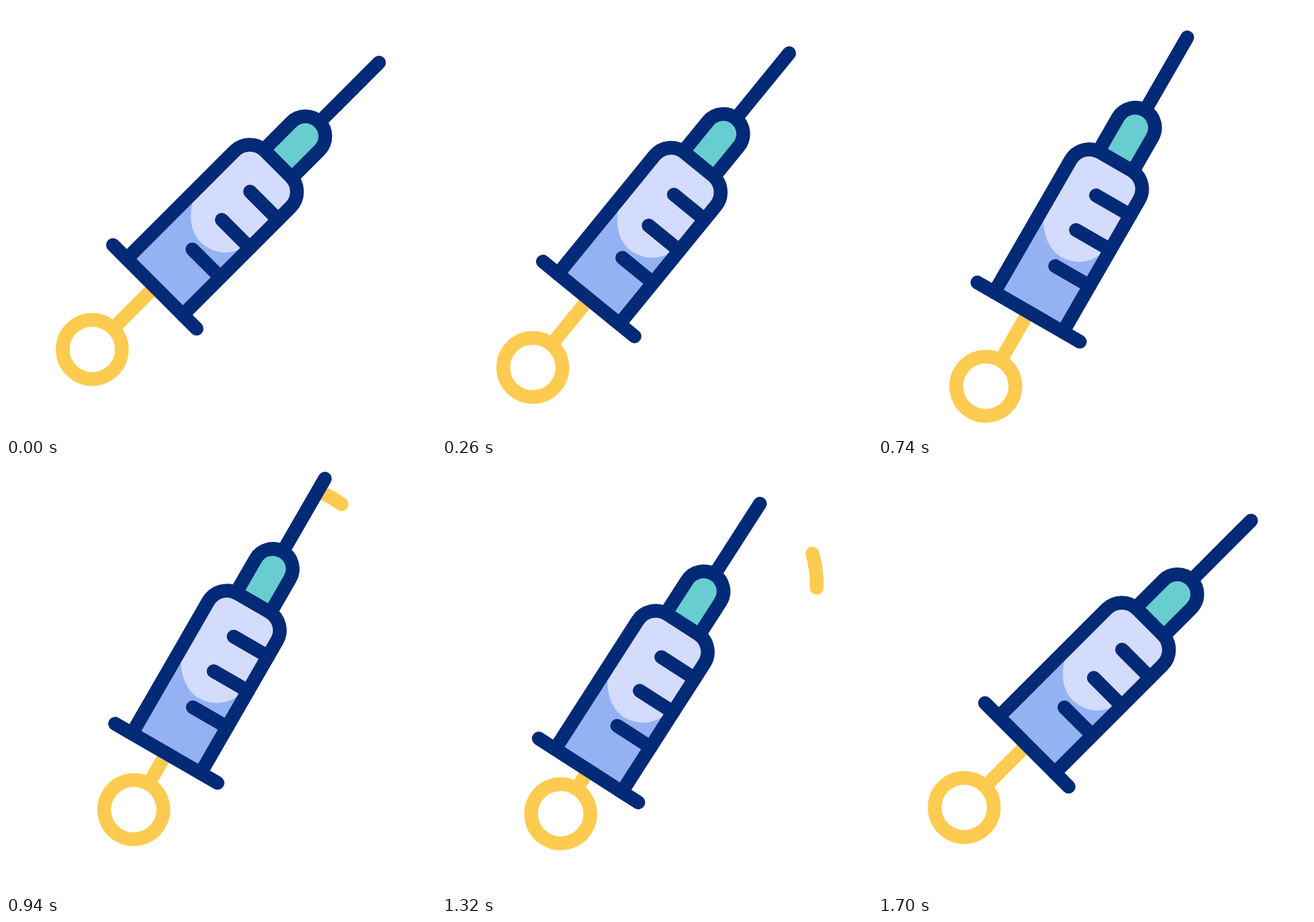
An HTML page that plays this animation: 640 px wide and 640 px high, repeating every 2.4 s.

```html
<!DOCTYPE html>
<html lang="en">
<head>
<meta charset="utf-8">
<title>Syringe</title>
<style>
  html, body { margin: 0; width: 100%; height: 100%; overflow: hidden; background: #fff; }
  svg { display: block; width: 100%; height: 100%; }
  .navy, .gold { fill: none; stroke-width: 20.5; stroke-linecap: round; }
  .navy { stroke: #032a76; }
  .gold { stroke: #fecb51; }
</style>
</head>
<body>
<svg viewBox="0 0 640 640">
  <defs>
    <path id="barrel" d="M-59 0V-227a32 32 0 0 1 32-32h54a32 32 0 0 1 32 32V0"/>
    <clipPath id="inside"><use href="#barrel"/></clipPath>
  </defs>
  <path id="drop" class="gold"/>
  <!-- Needle points up; the origin is the middle of the flange -->
  <g id="syringe">
    <g id="plunger" class="gold">
      <path d="M0-44V-131"/>
      <circle r="44"/>
    </g>
    <path class="navy" d="M0-347V-472"/>
    <path class="navy" style="fill:#68cdd1" d="M-29.6-259V-317a29.6 29.6 0 0 1 59.2 0V-259"/>
    <g clip-path="url(#inside)">
      <path fill="#94b2f3" d="M-59 0V-259H59V0z"/>
      <path fill="#d3dcfd" d="M-59-259H59V-128H50Q36-97 1-95Q-28-96-49-128H-59z"/>
    </g>
    <path class="navy" d="M0-200.5H59M0-141H59M0-79H59"/>
    <use href="#barrel" class="navy"/>
    <path class="navy" d="M-88 0H88"/>
  </g>
</svg>
<script>
const LOOP = 2400;
const [drop, syringe, plunger] = ['drop', 'syringe', 'plunger'].map(id => document.getElementById(id));

// Cubic ease from 0 to 1 with a chosen slope at each end
function ease(t, from, to, m0 = 0, m1 = 0) {
  const u = Math.min(1, Math.max(0, (t - from) / (to - from)));
  return u * u * (3 - 2 * u) + m0 * u * (1 - u) ** 2 + m1 * u * u * (u - 1);
}

// Linear interpolation through [time, value] pairs
function along(keys, t) {
  let i = 1;
  while (i < keys.length - 1 && t > keys[i][0]) i++;
  const [t0, a] = keys[i - 1], [t1, b] = keys[i];
  return a + (b - a) * Math.min(1, Math.max(0, (t - t0) / (t1 - t0)));
}

// Angles in degrees on the arc the liquid flies along
const head = [[880, -66], [1080, -26], [1140, -16], [1500, 20], [1600, 30]];
const tail = [[960, -66], [1140, -38.2], [1500, 5.4], [1600, 30]];

function arc(cx, cy, r, a, b) {
  const at = deg => {
    const rad = deg * Math.PI / 180;
    return `${cx + r * Math.cos(rad)} ${cy + r * Math.sin(rad)}`;
  };
  return `M${at(a)}A${r} ${r} 0 0 1 ${at(b)}`;
}

function draw(now) {
  const t = now % LOOP;
  const tilt = ease(t, 0, 670, .34) - ease(t, 1140, 1700, 0, .91);
  const thrust = 43.5 * (ease(t, 610, 1020) - ease(t, 1020, 1295));
  const press = 55.7 * (ease(t, 660, 1140) - ease(t, 1300, 1640));

  const x = 221.5 - 11.55 * tilt + 9 * tilt * tilt;
  const y = 418 + 46.6 * tilt;
  syringe.setAttribute('transform', `translate(${x} ${y}) rotate(${45 - 15 * tilt}) translate(0 ${-thrust})`);
  plunger.setAttribute('transform', `translate(0 ${131.7 - press})`);

  const flying = t > 890 && t < 1600;
  const drift = 1 - tilt;
  drop.setAttribute('d', flying
    ? arc(405 - 40 * drift, 189 - 59 * drift, 160, along(tail, t), along(head, t))
    : '');
  requestAnimationFrame(draw);
}
requestAnimationFrame(draw);
</script>
</body>
</html>
```
